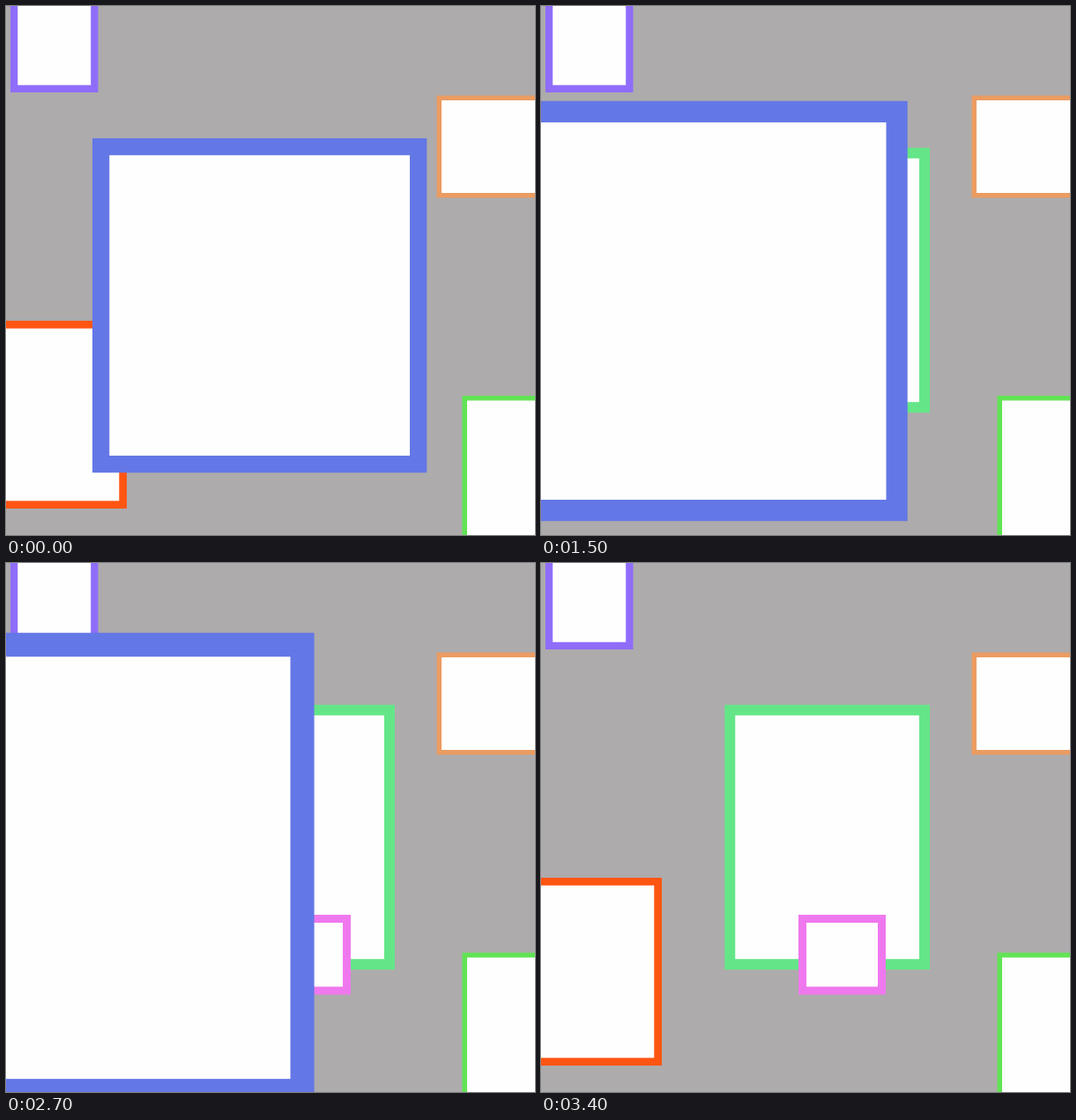
Animation, 600 px wide and 600 px high, one loop 4000 ms. Source, as an HTML page:

```html
<!DOCTYPE html>
<html lang="en">
<head>
<meta charset="utf-8">
<title>Framed boxes</title>
<style>
html, body { margin: 0; width: 100%; height: 100%; overflow: hidden; background: #adabac; }
svg { display: block; width: 100vw; height: 100vh; }
</style>
</head>
<body>
<svg id="stage" viewBox="0 0 600 600"></svg>
<script>
const LOOP = 4000;
const stage = document.getElementById('stage');

// A white box whose border lies inside its outer edges.
function place(box, x, y, w, h, line) {
  const attrs = { x: x + line / 2, y: y + line / 2, width: w - line, height: h - line, 'stroke-width': line };
  for (const key in attrs) box.setAttribute(key, attrs[key]);
}

function addBox(color, x, y, w, h, line) {
  const box = document.createElementNS('http://www.w3.org/2000/svg', 'rect');
  box.setAttribute('fill', '#fffeff');
  box.setAttribute('stroke', color);
  place(box, x, y, w, h, line);
  stage.appendChild(box);
  return box;
}

addBox('#8f6dfa', 5, -60, 99.5, 158, 8.3);
addBox('#eb9c62', 488.5, 101.5, 160, 116, 5.5);
addBox('#ff5512', -60, 357, 197, 213, 8.7);
addBox('#62e355', 517.5, 442, 160, 220, 5.5);
addBox('#64e688', 208.3, 160.8, 232.7, 300.4, 12);
addBox('#ef78ee', 292, 399, 99, 90.5, 9);
const front = addBox('#6477e6', 98, 150, 379, 379, 19);

// The front box comes nearer in hard steps, then is gone: start, right, top, size.
const steps = [
  [0, 477.3, 150, 379.3],
  [400, 456.4, 127.7, 440],
  [1400, 415.7, 107.8, 476.4],
  [2300, 382.8, 97.2, 501],
  [2700, 349.6, 79.2, 533],
  [3000]
];

function draw(t) {
  const [, right, top, size] = steps.filter(s => s[0] <= t).pop();
  front.style.display = size ? '' : 'none';
  if (size) place(front, right - size, top, size, size, size * 0.0508);
}

const begin = performance.now();
function tick() {
  draw((performance.now() - begin) % LOOP);
  requestAnimationFrame(tick);
}
tick();
</script>
</body>
</html>
```
